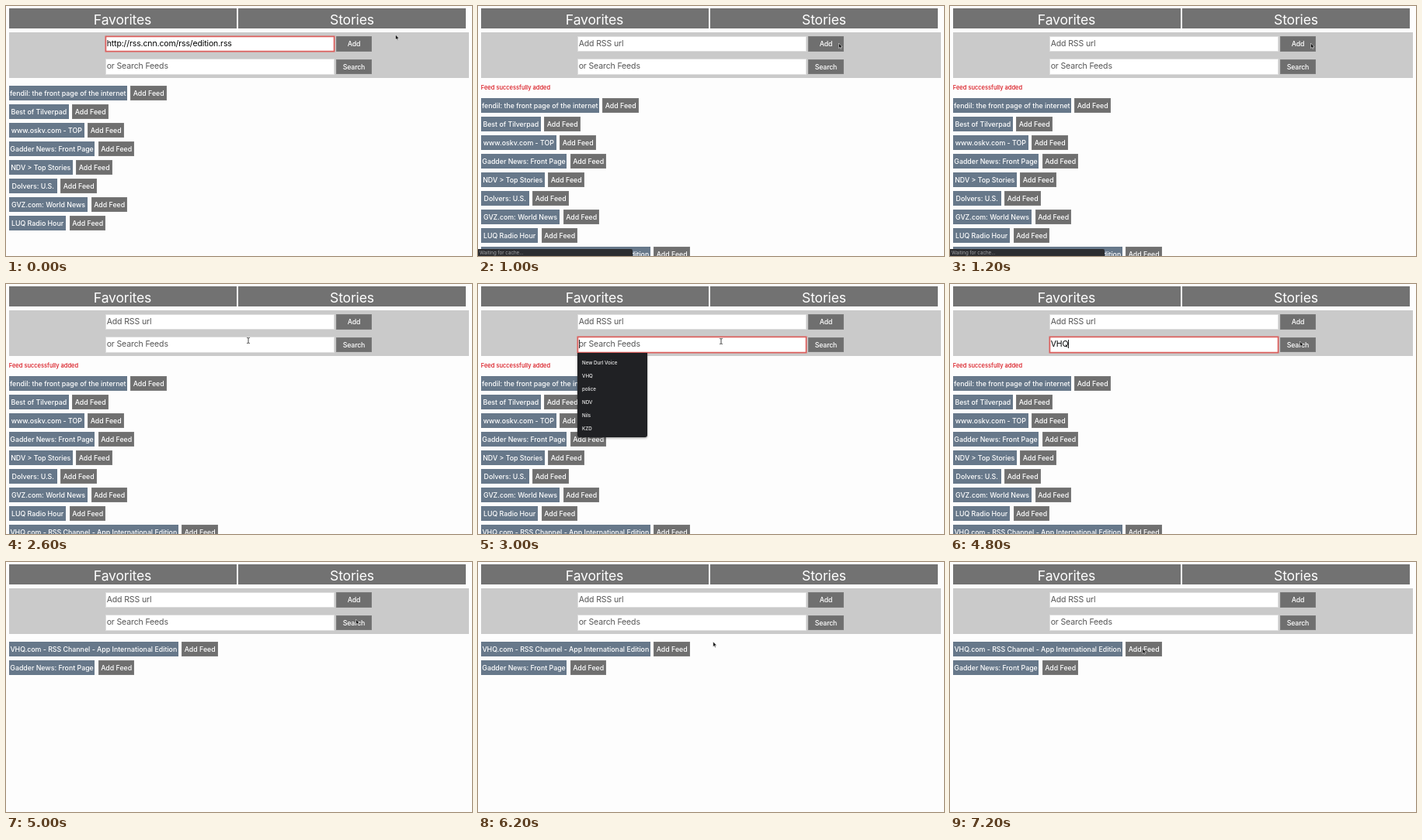
Recreate the animation shown at these times as an HTML page. Size 600x323 px, loop 8 s.

```html
<!DOCTYPE html>
<html lang="en">
<head>
<meta charset="utf-8">
<title>Feed reader</title>
<style>
  html, body { margin: 0; width: 100%; height: 100%; overflow: hidden; background: #fdfdfd; }
  #stage {
    position: relative; width: 600px; height: 323px; overflow: hidden; background: #fdfdfd;
    font-family: Inter, Roboto, sans-serif; white-space: pre;
  }
  #stage div, #stage svg { position: absolute; box-sizing: border-box; }
  .tab { top: 3px; width: 293px; height: 26px; line-height: 29px; background: #727272; color: #fff; font-size: 17.6px; letter-spacing: -.01em; text-align: center; }
  .panel { left: 3.5px; top: 34px; width: 592.5px; height: 59px; background: #cacaca; }
  .field { left: 128px; width: 295px; height: 20.5px; line-height: 18.8px; padding-left: .7px; background: #fff; border: .5px solid #ddd; color: #555; font-size: 10.5px; letter-spacing: -.012em; }
  .field.typed { color: #000; }
  .field.focus { border-color: #dc5f5d; box-shadow: inset 0 0 0 .3px #dc5f5d, 0 0 0 .5px #dc5f5d; }
  .btn { height: 19.5px; line-height: 19.5px; color: #fff; background: #6f6f6f; font-size: 8.8px; font-weight: 500; text-align: center; box-shadow: inset 0 0 0 .5px #858585; }
  .go { left: 425px; width: 46px; letter-spacing: -.02em; }
  #list { left: 0; top: 0; }
  .feed { left: 3.8px; background: #67788a; box-shadow: none; }
  .add { width: 46.5px; }
  #note { left: 3.8px; top: 99.6px; line-height: 12px; font-size: 7.5px; font-weight: 500; color: #d8141c; }
  #stage #caret { display: inline-block; position: static; width: .8px; height: 11px; margin-right: -.8px; vertical-align: -2px; background: #222; }
  #menu { left: 128px; top: 89px; width: 90px; padding: 4px 0 3px 6px; border-radius: 0 0 3px 3px; background: #202124; color: #eee; font-size: 6.2px; font-weight: 500; line-height: 17px; box-shadow: 0 1px 3px #0006; }
  #status { left: 0; top: 313.5px; width: 199px; height: 10px; line-height: 9.5px; padding-left: 2px; border-radius: 0 2px 0 0; background: #2c2d30; color: #a4a6a9; font-size: 6.2px; }
  #mouse { left: 0; top: 0; width: 10px; height: 12px; overflow: visible; }
</style>
</head>
<body>
<div id="stage">
  <div class="tab" style="left:3.5px">Favorites</div>
  <div class="tab" style="left:299px">Stories</div>
  <div class="panel"></div>
  <div class="field" id="url" style="top:38.5px"></div>
  <div class="btn go" style="top:39px">Add</div>
  <div class="field" id="query" style="top:68px"></div>
  <div class="btn go" style="top:68.7px">Search</div>
  <div id="note">Feed successfully added</div>
  <div id="list"></div>
  <div id="menu"></div>
  <div id="status">Waiting for cache...</div>
  <svg id="mouse">
    <path id="arrow" d="M0 0V6.6L1.5 5.3L2.5 7.5L3.5 7L2.6 4.9H4.6Z" fill="#111" stroke="#fff" stroke-width=".5"/>
    <path id="beam" d="M-1.8 -3.6Q0 -3.6 0 -2.6Q0 -3.6 1.8 -3.6M0 -2.6V2.6M-1.8 3.6Q0 3.6 0 2.6Q0 3.6 1.8 3.6" fill="none" stroke="#333" stroke-width=".9"/>
  </svg>
</div>
<script>
const LOOP = 8000, STEP = 200;
const $ = id => document.getElementById(id);

// title, button width
const feeds = [
  ['fendil: the front page of the internet', 152],
  ['Best of Tilverpad', 77],
  ['www.oskv.com - TOP', 97],
  ['Gadder News: Front Page', 110.5],
  ['NDV > Top Stories', 82],
  ['Dolvers: U.S.', 62],
  ['GVZ.com: World News', 101.5],
  ['LUQ Radio Hour', 73.5],
  ['VHQ.com - RSS Channel - App International Edition', 218]
];
const recent = ['New Durl Voice', 'VHQ', 'police', 'NDV', 'Nils', 'KZD'];

// time, x, y of the pointer
const path = [
  [0, 501.5, 37], [200, 500, 38], [800, 464.5, 48], [1200, 464.5, 48],
  [2400, 314, 73], [2600, 312, 73], [2800, 313, 74], [3800, 313, 74],
  [4800, 450.5, 74], [5400, 450.5, 74], [6600, 251, 113], [7200, 248, 112], [LOOP, 248, 112]
];

function pointer(t) {
  const i = path.findIndex(p => p[0] > t);
  const [t0, x0, y0] = path[i - 1], [t1, x1, y1] = path[i];
  const u = (t - t0) / (t1 - t0), e = u * u * (3 - 2 * u);
  return [x0 + (x1 - x0) * e, y0 + (y1 - y0) * e];
}

const show = (id, on) => { $(id).style.display = on ? '' : 'none'; };

function box(cls, text, left, width) {
  const el = document.createElement('div');
  el.className = 'btn ' + cls;
  el.textContent = text;
  if (left) el.style.left = left + 'px';
  if (width) el.style.width = width + 'px';
  $('list').append(el);
  return el;
}
const rows = feeds.map(([title, w]) => [box('feed', title, 0, w), box('add', 'Add Feed', w + 8.4)]);

function layout(order, top) {
  rows.forEach((pair, i) => {
    const k = order.indexOf(i);
    for (const el of pair) {
      el.style.display = k < 0 ? 'none' : '';
      el.style.top = top + 24 * k + 'px';
    }
  });
}

function field(id, text, hint, focus, caret) {
  const el = $(id), bar = caret ? '<div id="caret"></div>' : '';
  el.className = 'field' + (text ? ' typed' : '') + (focus ? ' focus' : '');
  el.innerHTML = text ? text + bar : bar + hint;
}

function render(t) {
  const added = t >= 1000 && t < 5000;
  const searching = t >= 3000 && t < 5000;
  const typed = searching ? 'VHQ'.slice(0, (t - 3000) / STEP) : '';

  field('url', t < 1000 ? 'http://rss.cnn.com/rss/edition.rss' : '', 'Add RSS url', t < 800, false);
  field('query', typed, 'or Search Feeds', searching, searching);
  show('note', added);
  show('status', t >= 1000 && t < 1600);
  show('menu', t >= 3000 && t < 3800);
  $('menu').textContent = recent.filter(s => s.startsWith(typed)).join('\n');

  if (t >= 5000) layout([8, 3], 102.8);
  else layout([...feeds.keys()].slice(0, added ? 9 : 8), added ? 118.8 : 102.8);

  const [x, y] = pointer(t);
  const overField = x > 128 && x < 423 && (y > 38 && y < 59 || y > 68 && y < 89);
  show('mouse', t < 3200 || t >= 4000);
  show('arrow', !overField);
  show('beam', overField);
  $('mouse').style.transform = `translate(${x}px,${y}px)`;
}

const start = performance.now();
let last = -1;
function tick() {
  const t = Math.floor((performance.now() - start) % LOOP / STEP) * STEP;
  if (t !== last) render(last = t);
  requestAnimationFrame(tick);
}
tick();
</script>
</body>
</html>
```
